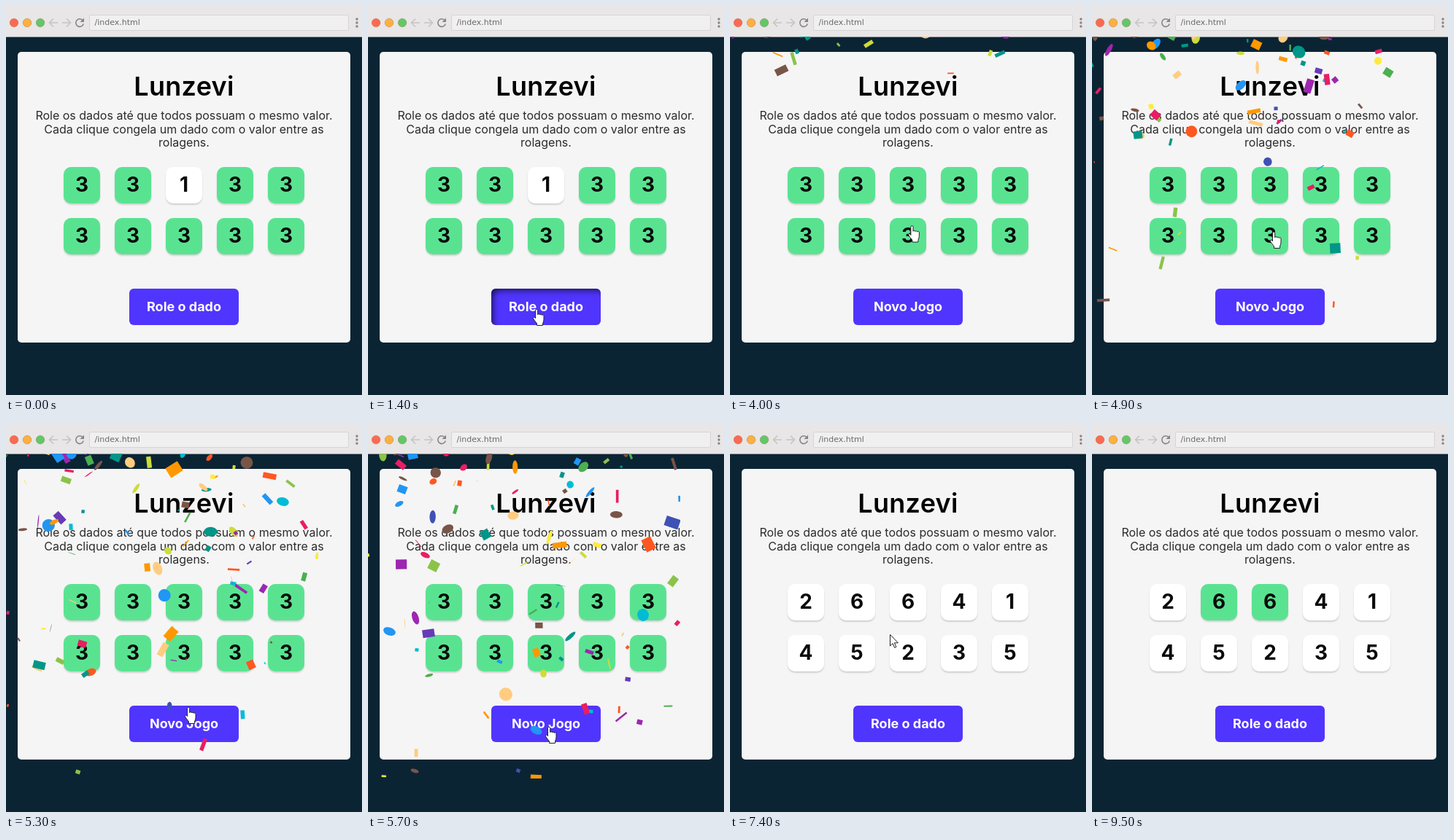
These frames come from a looping animation (488x534 px, 10 s). An HTML page with a canvas:

```html
<!DOCTYPE html>
<html lang="pt-BR">
<head>
<meta charset="utf-8">
<title>Lunzevi</title>
<style>
  html, body { margin: 0; width: 100%; height: 100%; overflow: hidden; background: #0b2434; }
  .stage { position: relative; width: 488px; height: 534px; overflow: hidden; background: #0b2434; font-family: Inter, Roboto, sans-serif; }
  .stage > *, .die { position: absolute; }
  .bar { left: 0; top: 0; }
  .url { left: 121.5px; top: 15px; font: 11px/16px "DejaVu Sans", sans-serif; color: #6a6a6a; }
  .card { left: 16px; top: 63px; width: 456px; height: 399px; border-radius: 5px; background: #f5f5f5; }
  h1, p { left: 0; width: 488px; margin: 0; text-align: center; white-space: nowrap; }
  h1 { top: 90px; font-size: 36px; line-height: 40px; font-weight: 600; letter-spacing: .3px; color: #050505; }
  p { top: 141.2px; font-size: 16px; line-height: 18.6px; color: #2b2b2b; }
  .die {
    width: 50px; height: 50px; border-radius: 10px; background: #fff;
    box-shadow: 0 2px 2px rgba(0, 0, 0, .15);
    font-size: 28px; line-height: 48px; font-weight: 700; text-align: center; color: #0a0a0a;
  }
  .held { background: #59e391; }
  .roll {
    left: 169px; top: 388px; width: 150px; height: 50px; border-radius: 6px; background: #5035ff;
    color: #fff; font-size: 18px; line-height: 50px; font-weight: 700; text-align: center;
  }
  .pressed { box-shadow: inset 5px 5px 10px -3px rgba(0, 0, 0, .7); }
  canvas { left: 0; top: 42px; }
  .cursor { left: 0; top: 0; overflow: visible; fill: #fff; stroke: #222; stroke-linejoin: round; }
</style>
</head>
<body>
<div class="stage">
  <svg class="bar" width="488" height="43">
    <rect width="488" height="42" fill="#e8e6e6"/>
    <rect y="42" width="488" height="1" fill="#8b9096"/>
    <g stroke-opacity=".25" stroke="#803020">
      <circle cx="11" cy="23" r="5.8" fill="#fb6a50"/>
      <circle cx="29" cy="23" r="5.8" fill="#fcb040"/>
      <circle cx="47" cy="23" r="5.8" fill="#62c866"/>
    </g>
    <g fill="none" stroke="#c6c4c4" stroke-width="1.6">
      <path d="M71 23H60m5-5.5L59.5 23l5.5 5.5M77 23h11m-5-5.5l5.5 5.5-5.5 5.5"/>
      <path stroke="#858585" d="M104.700 19.200A5.300 5.300 0 1 0 106.200 24.500"/>
    </g>
    <path fill="#858585" d="M107 16.5v5.5h-5.5z"/>
    <rect x="114.500" y="12.500" width="355" height="21" rx="1.5" fill="#f1f0f0" stroke="#d6d4d4"/>
    <g fill="#858585">
      <circle cx="481" cy="18" r="1.7"/><circle cx="481" cy="23" r="1.7"/><circle cx="481" cy="28" r="1.7"/>
    </g>
  </svg>
  <div class="url">/index.html</div>
  <div class="card"></div>
  <h1>Lunzevi</h1>
  <p>Role os dados até que todos possuam o mesmo valor.<br>Cada clique congela um dado com o valor entre as<br>rolagens.</p>
  <div class="dice" style="left:0;top:0"></div>
  <div class="roll">Role o dado</div>
  <canvas width="428" height="446"></canvas>
  <svg class="cursor" width="20" height="26">
    <path id="hand" transform="translate(-6 -.5)" d="M4.5 13.5V2.2a1.6 1.6 0 0 1 3.2 0V8.2a1.5 1.5 0 0 1 2.9.3 1.5 1.5 0 0 1 2.8.5 1.4 1.4 0 0 1 2.6.8V15.5c0 2-1.2 3-1.4 5v2.5H6.5v-2.5C5.5 18.5 3 16.5 1.6 13.6c-.7-1.6 1-2.8 2.9-.6z"/>
    <path id="arrow" d="M.5.5V16l3.6-3.4 2.5 5.9 2.3-1-2.5-5.700h5z"/>
  </svg>
</div>
<script>
const LOOP = 10000, STEP = 100;
const $ = s => document.querySelector(s);
const roll = $('.roll'), cursor = $('.cursor'), hand = $('#hand'), arrow = $('#arrow');
const ctx = $('canvas').getContext('2d');

const spots = Array.from({ length: 10 }, (_, i) => [79 + i % 5 * 70, 221 + Math.floor(i / 5) * 70]);
const dice = spots.map(([x, y]) => {
  const die = document.createElement('div');
  die.style.left = x + 'px';
  die.style.top = y + 'px';
  $('.dice').append(die);
  return die;
});

// Cursor path: time, x, y of the tip
const path = [
  [100, 261, 461], [300, 238, 428], [500, 231, 416], [2500, 231, 416],
  [2600, 258, 322], [2700, 285, 278], [2800, 268, 255], [3000, 247, 244], [3300, 247, 244],
  [4200, 250, 318], [4900, 249, 310], [5300, 250, 390], [5700, 248, 417],
  [6200, 245, 412], [7300, 245, 412], [7400, 219, 290], [7600, 180, 250], [7900, 178, 248],
  [8300, 226, 254], [8500, 226, 256], [9100, 328, 352], [9200, 328, 352], [9400, 340, 495]
];

function cursorAt(t) {
  const i = path.findIndex(p => p[0] >= t);
  if (i < 0) return path[path.length - 1].slice(1);
  if (i === 0) return path[0].slice(1);
  const [t0, x0, y0] = path[i - 1], [t1, x1, y1] = path[i];
  const k = (t - t0) / (t1 - t0);
  return [x0 + (x1 - x0) * k, y0 + (y1 - y0) * k];
}

const within = (t, a, b) => t >= a && t < b;
const inBox = (x, y, l, t, w, h) => within(x, l, l + w) && within(y, t, t + h);

// Confetti
const colors = ['#e91e63', '#9c27b0', '#673ab7', '#3f51b5', '#2196f3', '#00bcd4', '#009688', '#4caf50',
  '#8bc34a', '#cddc39', '#ffeb3b', '#ff9800', '#ff5722', '#795548', '#ffcc80'];
let seed = 71;
const random = (a, b) => {
  seed = (seed * 16807) % 2147483647;
  return a + (b - a) * seed / 2147483647;
};
const pieces = Array.from({ length: 280 }, (_, i) => ({
  start: 3300 + i * 12,
  x: random(0, 428), vx: random(-1.5, 1.5), vy: random(-5, 0),
  w: random(5, 20), h: random(5, 20), r: random(5, 10),
  shape: Math.floor(random(0, 3)),
  color: colors[Math.floor(random(0, colors.length))],
  angle: random(0, 6.28), spin: random(-.2, .2), flip: random(0, 40)
}));

function drawPiece(p, n) {
  const flip = Math.abs((n + p.flip) % 40 - 20) / 10 - 1;
  ctx.save();
  ctx.translate(p.x + p.vx * n, p.vy * n + .05 * n * n);
  ctx.rotate(p.angle + p.spin * n);
  ctx.scale(1, flip);
  ctx.fillStyle = p.color;
  ctx.beginPath();
  if (p.shape === 0) ctx.arc(0, 0, p.r, 0, 7);
  else if (p.shape === 1) ctx.rect(-p.w / 2, -p.h / 2, p.w, p.h);
  else ctx.rect(-p.w / 6, -p.h / 2, p.w / 3, p.h);
  ctx.fill();
  ctx.restore();
}

function drawConfetti(t) {
  ctx.clearRect(0, 0, 428, 446);
  if (!within(t, 3300, 6700)) return;
  for (const p of pieces) {
    if (t > p.start) drawPiece(p, (t - p.start) * .06);
  }
}

function isHeld(i, t) {
  if (t < 3100) return i !== 2;
  if (t < 6700) return true;
  return (i === 1 && t >= 7800) || (i === 2 && t >= 8400);
}

function render(t) {
  const values = t < 2200 ? '3313333333' : t < 6700 ? '3333333333' : '2664145235';
  dice.forEach((die, i) => {
    die.textContent = values[i];
    die.className = isHeld(i, t) ? 'die held' : 'die';
  });

  const pressed = within(t, 900, 1100) || within(t, 1400, 1600) || within(t, 2100, 2200) || within(t, 6600, 6700);
  roll.classList.toggle('pressed', pressed);
  roll.textContent = within(t, 3100, 6700) ? 'Novo Jogo' : 'Role o dado';

  drawConfetti(t);

  const [x, y] = cursorAt(t);
  const pointing = inBox(x, y, 169, 388, 150, 50) || spots.some(([l, top]) => inBox(x, y, l, top, 50, 50));
  cursor.style.display = within(t, 100, 9500) ? '' : 'none';
  cursor.style.transform = `translate(${x}px, ${y}px)`;
  hand.style.display = pointing ? '' : 'none';
  arrow.style.display = pointing ? 'none' : '';
}

const origin = performance.now();
let last = -1;
function tick() {
  const t = Math.floor((performance.now() - origin) % LOOP / STEP) * STEP;
  if (t !== last) render(last = t);
  requestAnimationFrame(tick);
}
tick();
</script>
</body>
</html>
```
